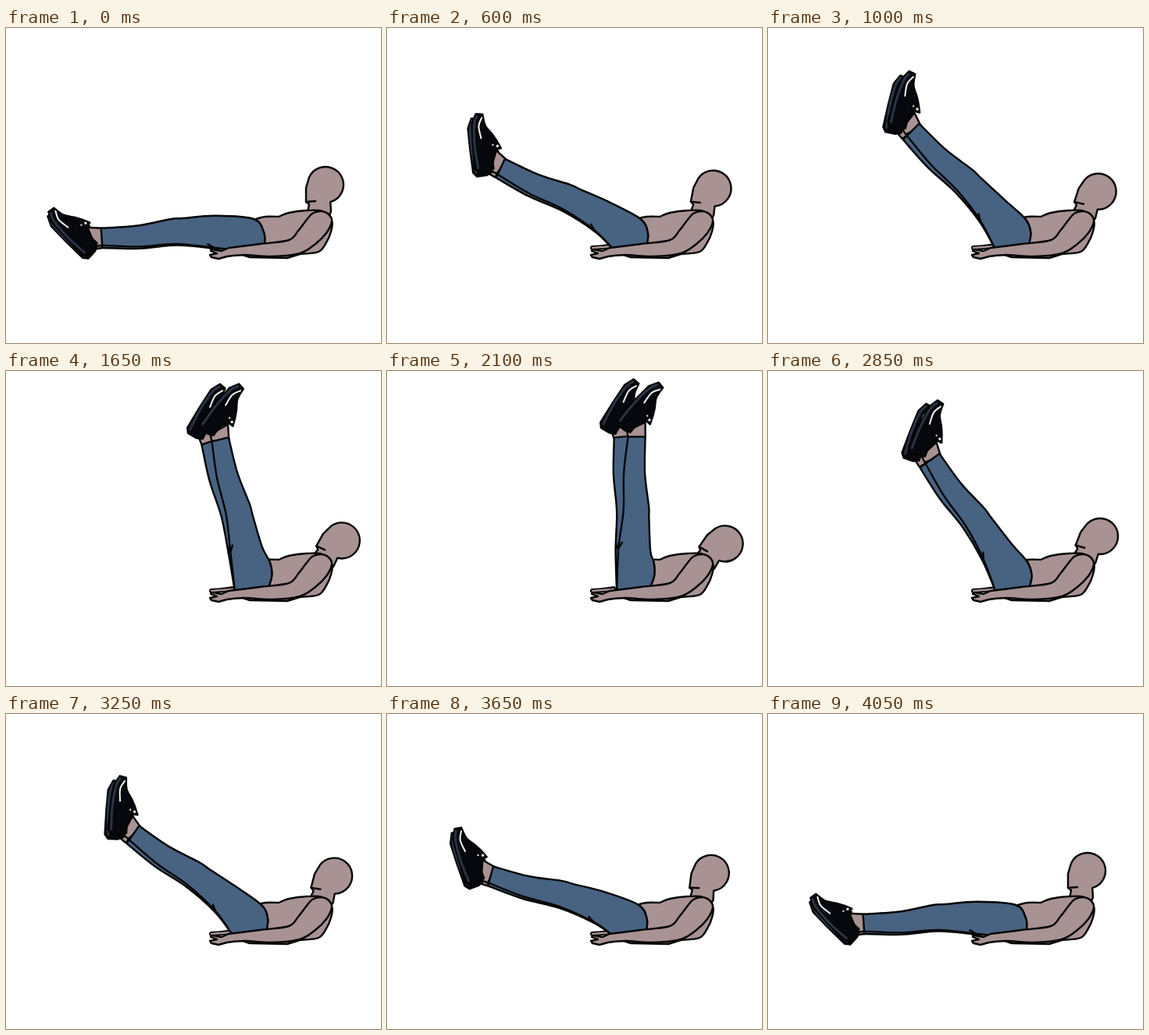
An HTML page with a canvas for the animation above (4100 ms loop, 480 px wide and 404 px high).

```html
<!DOCTYPE html>
<html lang="en">
<head>
<meta charset="utf-8">
<title>Leg raise</title>
<style>
  html, body { margin: 0; width: 100%; height: 100%; overflow: hidden; background: #fff; }
  canvas { display: block; }
</style>
</head>
<body>
<canvas id="stage" width="480" height="404"></canvas>
<script>
const ctx = document.getElementById('stage').getContext('2d');
const SKIN = '#a89293', CLOTH = '#486282', INK = '#050505', SHOE = '#07080d';
const LOOP = 4100, STEP = 50, PEAK = 2025;
const HIP = [311, 266], SHIN = 95;
const rad = degrees => degrees * Math.PI / 180;

function lines(p) {
  for (let i = 0; i < p.length; i += 2) ctx.lineTo(p[i], p[i + 1]);
}

// Smooth curve through x, y pairs, joined to the current path.
function curve(p) {
  const last = p.length / 2 - 1;
  const at = (i, k) => p[2 * Math.max(0, Math.min(last, i)) + k];
  ctx.lineTo(p[0], p[1]);
  for (let i = 0; i < last; i++) {
    const c = [0, 1].map(k => at(i, k) + (at(i + 1, k) - at(i - 1, k)) / 6);
    const d = [0, 1].map(k => at(i + 1, k) - (at(i + 2, k) - at(i, k)) / 6);
    ctx.bezierCurveTo(...c, ...d, at(i + 1, 0), at(i + 1, 1));
  }
}

function stroke(color = INK, width = 2.4) {
  ctx.strokeStyle = color;
  ctx.lineWidth = width;
  ctx.stroke();
}

function shape(fill, trace) {
  ctx.beginPath();
  trace();
  ctx.closePath();
  ctx.fillStyle = fill;
  ctx.fill();
  stroke();
}

function line(points, color, width) {
  ctx.beginPath();
  curve(points);
  stroke(color, width);
}

function turned([x, y], degrees, draw) {
  ctx.save();
  ctx.translate(x, y);
  ctx.rotate(rad(degrees));
  draw();
  ctx.restore();
}

// Maps distances along a limb and towards its front side to the stage.
function limb([x, y], degrees) {
  const c = Math.cos(rad(degrees)), s = Math.sin(rad(degrees));
  return (along, front) => [x - along * c + front * s, y - along * s - front * c];
}

// Ankle and shoe, with the middle of the cuff at the origin.
function foot() {
  shape(SKIN, () => lines([-18,-12, 1,-11, 1,11, -8,12]));
  shape(SHOE, () => {
    lines([-68,-32, -61,-37]);
    curve([-61,-37, -49,-28, -35,-25, -25,-22]);
    lines([-15,-18, -20,-13]);
    curve([-20,-13, -16,-2, -6,8]);
    lines([-9,15, -18,24, -25,23, -46,1, -64,-19]);
  });
  line([-65,-30, -61,-20, -43,1, -22,20], '#2b3444', 3);
  line([-59,-33, -55,-22, -43,-12], '#f4f4f4', 2);
  ctx.fillStyle = '#eee';
  ctx.fillRect(-22, -19, 3, 3);
  ctx.fillRect(-27, -16, 2, 2);
}

// The leg u milliseconds into the lift, trailing by some degrees.
function leg(u, lag) {
  const thighTurn = 3 + 0.0472 * u - lag, shinTurn = 0.0485 * u - 4 - lag;
  const length = 94 - 7 * Math.sin(rad(thighTurn)) ** 2;
  const thigh = limb(HIP, thighTurn);
  const shin = limb(thigh(length, 0), shinTurn);
  const crease = thigh(length - 50, -18);
  const shift = u / 160;

  turned(shin(SHIN, 0), 87 * Math.sin(u / PEAK * Math.PI / 2) - 2 * lag, foot);
  shape(CLOTH, () => {
    curve([
      ...shin(SHIN, 11), ...shin(48, 11), ...shin(5, 16.5),
      ...thigh(length - 8, 17.5), ...thigh(length - 50, 23),
      317 + 2 * shift, 245, 330 + shift, 262, 331 + shift / 2, 277
    ]);
    curve([
      288 + shift / 2, 284, ...crease,
      ...shin(0, -16), ...shin(48, -16), ...shin(SHIN, -11)
    ]);
  });
  line([...crease, ...thigh(length - 42, -14)]);
}

// Placed with the base of the neck at the origin.
function head() {
  shape(SKIN, () => {
    lines([-2,-12, 0,-23, -4,-26, -4,-44]);
    ctx.arc(21, -48, 23, Math.PI + 0.4, 2 * Math.PI + 1.3);
    lines([28,-14, 20,6, 0,4]);
  });
  line([-4,-26, 8,-27]);
}

function torso() {
  shape(SKIN, () => {
    curve([316,246, 332,242, 349,242]);
    curve([349,242, 362,237, 385,234, 405,235, 417,247, 416,261, 410,275, 400,287, 376,290]);
    lines([360,295, 312,294, 300,290, 322,277]);
  });
}

function arm() {
  shape(SKIN, () => {
    curve([285,282, 325,277, 362,272, 374,260, 384,247, 392,238, 403,235, 413,239,
      417,248, 410,263, 396,277, 376,289, 340,293, 305,291, 283,293]);
    lines([272,296, 263,294, 261,291, 270,289, 262,286, 264,284, 276,286]);
  });
}

function draw(time) {
  const t = Math.floor(time % LOOP / STEP) * STEP;
  const u = PEAK - Math.abs(PEAK - t);

  ctx.fillStyle = '#fff';
  ctx.fillRect(0, 0, 480, 404);
  turned([388, 249], 36 * u / PEAK, head);
  torso();
  line([263,282, 276,281, 290,279], INK, 6);
  line([263,282, 276,281, 290,280], SKIN, 2.5);
  leg(u, 1 + 5 * (u / PEAK) ** 2);
  leg(u, 0);
  arm();
}

ctx.lineJoin = ctx.lineCap = 'round';
const start = performance.now();
function tick() {
  draw(performance.now() - start);
  requestAnimationFrame(tick);
}
tick();
</script>
</body>
</html>
```
